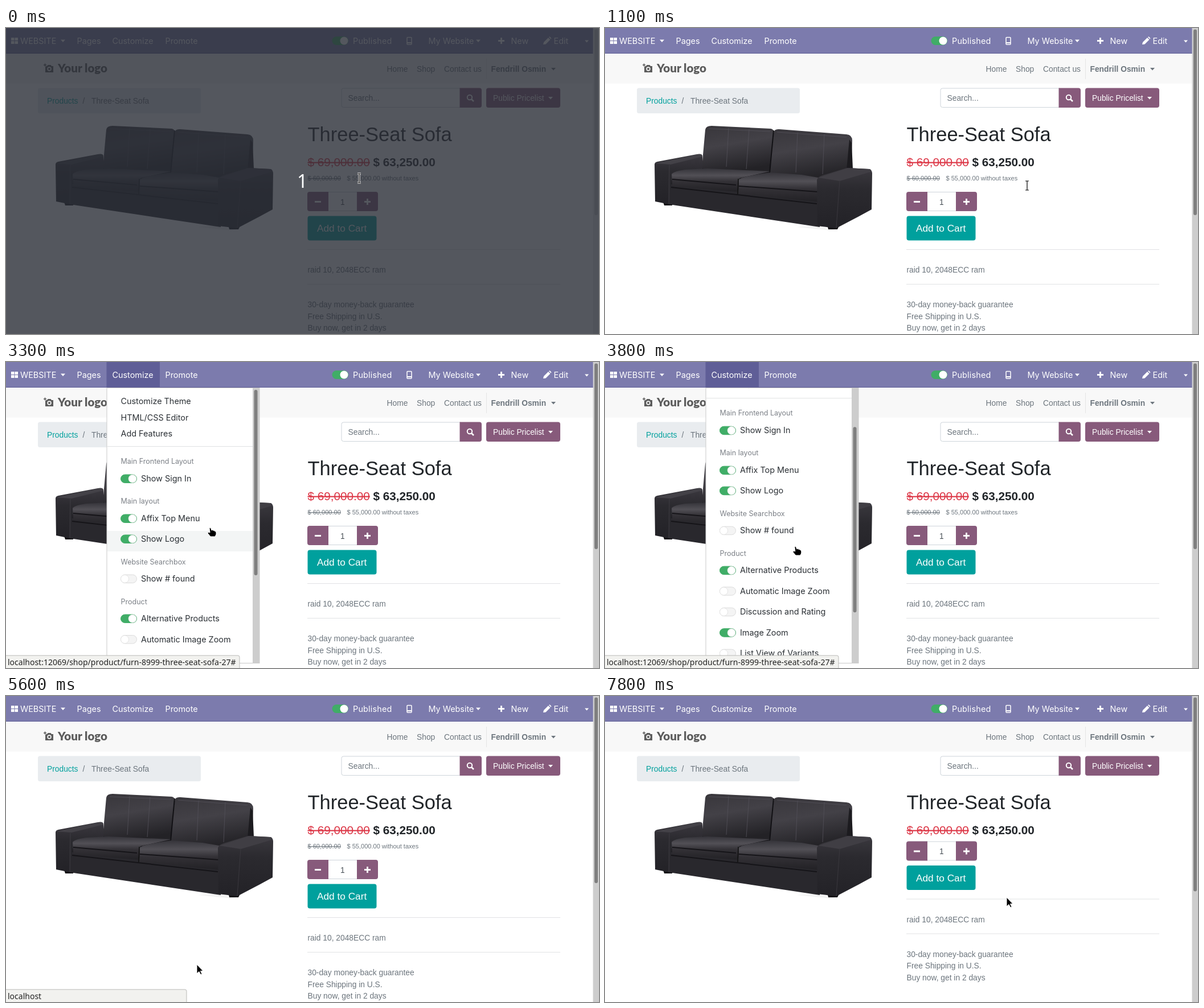
An HTML page for the animation above (8 s loop, 1041 px wide and 538 px high).

```html
<!DOCTYPE html>
<html lang="en">
<head>
<meta charset="utf-8">
<title>Shop page customization</title>
<style>
html, body { margin: 0; width: 100%; height: 100%; overflow: hidden; background: #fff; }
svg { display: block; width: 100vw; height: 100vh; }
text { white-space: pre; }
.page { font: 13.8px "Liberation Sans", Arial, sans-serif; fill: #6c757d; }
.bar { font: 14.4px Inter, sans-serif; fill: #fff; }
.menu { font: 14.4px Inter, sans-serif; fill: #2b3035; }
.head { font-size: 12.5px; fill: #7c8087; }
.status { font: 14px "Noto Sans", sans-serif; fill: #222; }
.strike { text-decoration: line-through; }
.bold { font-weight: 700; }
</style>
</head>
<body>
<svg id="stage" viewBox="0 0 1041 538" preserveAspectRatio="none">
  <defs>
    <linearGradient id="back" x1="0" y1="0" x2=".25" y2="1"><stop stop-color="#38363b"/><stop offset=".45" stop-color="#434147"/><stop offset="1" stop-color="#232226"/></linearGradient>
    <linearGradient id="seat" x1="0" y1="0" x2="0" y2="1"><stop stop-color="#35343a"/><stop offset=".3" stop-color="#525056"/><stop offset=".55" stop-color="#333136"/><stop offset="1" stop-color="#222125"/></linearGradient>
    <linearGradient id="arm" x1="0" y1="0" x2="0" y2="1"><stop stop-color="#3b393f"/><stop offset=".35" stop-color="#2b2a2f"/><stop offset="1" stop-color="#232227"/></linearGradient>
    <clipPath id="menuClip"><rect x="178" y="46" width="255" height="483"/></clipPath>
  </defs>
  <rect width="1041" height="538" fill="#fff"/>

  <g class="page">
    <rect y="45" width="1031" height="52.5" fill="#f8f8f8"/>
    <g fill="#5c5c5c">
      <path d="M69 67h3l1.500-2h5l1.500 2h3v11H69z"/>
      <circle cx="76" cy="72" r="3.700" fill="#f8f8f8"/><circle cx="76" cy="72" r="2.100"/>
      <path d="M65 65h6M68 62v6" stroke="#f8f8f8" stroke-width="4"/><path d="M66 65h5M68.500 62.500v5" stroke="#5c5c5c" stroke-width="1.500"/>
      <text x="91" y="78" style="font:900 20.500px Lato,sans-serif">Your logo</text>
    </g>
    <text x="668.500" y="77">Home</text><text x="721" y="77">Shop</text><text x="769" y="77">Contact us</text>
    <path d="M843.500 54v36" stroke="#e5e5e5"/>
    <text x="851.500" y="77" class="bold">Fendrill Osmin</text>
    <path d="M957 70h8l-4 4.500z"/>

    <rect x="56" y="105.500" width="286" height="44.500" rx="3.500" fill="#e9ecef"/>
    <text x="72" y="133" fill="#00a09d">Products</text><text x="134.500" y="133">/</text><text x="150" y="133">Three-Seat Sofa</text>
    <rect x="589" y="106" width="212" height="33.500" rx="3.500" fill="#fff" stroke="#ced4da"/>
    <text x="600.500" y="128">Search...</text>
    <path d="M796.500 105.500h34.500a4 4 0 0 1 4 4v26.500a4 4 0 0 1-4 4h-34.500z" fill="#875a7b"/>
    <g fill="none" stroke="#fff" stroke-width="2"><circle cx="814" cy="122" r="4.200"/><path d="M817 125l4 4" stroke-width="2.500"/></g>
    <rect x="843" y="105.500" width="130" height="34.500" rx="4" fill="#875a7b"/>
    <text x="855" y="128" fill="#fff">Public Pricelist</text><path d="M952 121h8l-4 4.500z" fill="#fff"/>

    <g id="sofa">
      <path d="M336 350L378 347l14 7 18-2-12 4z" fill="#f3f3f3"/>
      <path d="M102 306h16v6h-14zM390 346h22l-4 8h-16z" fill="#151417"/>
      <path d="M115 250L172 236H432V300L375 345 112 300z" fill="#1b1a1e"/>
      <path d="M170 245L176 179Q177 172 187 172L291 177Q297 178 296 185L289 252 180 256z" fill="url(#back)"/>
      <path d="M289 256L296 184Q297 177 306 178L424 187Q434 188 434 198L432 250 374 270z" fill="url(#back)"/>
      <path d="M429 196l4 6 2 45-11 3z" fill="#1c1b1f"/>
      <path d="M182 177L290 182M302 183L424 192M217 176l-4 68M253 178l-5 70M338 184l-3 70M385 187l-3 70" fill="none" stroke="#54515a" stroke-width=".8"/>
      <path d="M296 180l-7 75" stroke="#111014" stroke-width="2"/>
      <path d="M87 240Q87 236 92 235L161 222Q171 220 171 227V248L118 256 113 310 88 305z" fill="url(#arm)"/>
      <path d="M88 238L165 222Q171 221 171 226L115 240z" fill="#434147"/>
      <path d="M112 274L377 299V350L112 310z" fill="#29282d"/>
      <path d="M117 257Q120 252 141 249L180 247 290 252 236 264 232 288 118 278z" fill="url(#seat)"/>
      <path d="M235 267Q238 261 290 254L345 258 380 264 375 306 234 292z" fill="url(#seat)"/>
      <path d="M118 266L230 276M235 278L374 288M116 280L372 309" fill="none" stroke="#151418" stroke-width="2"/>
      <path d="M234 265L233 292" stroke="#111" stroke-width="1.500"/>
      <path d="M372 267Q374 260 388 257L425 246 463 248Q469 249 469 256L468 319 446 331 406 352 373 348z" fill="url(#arm)"/>
      <path d="M374 263L427 246 465 248Q469 250 466 253L412 269z" fill="#403e44"/>
      <path d="M412 268L406 351" stroke="#3a383e"/>
      <path d="M113 241L112 309" stroke="#3e3c42"/>
    </g>

    <text x="529.500" y="198.500" font-size="34.500" fill="#212529">Three-Seat Sofa</text>
    <text x="529.500" y="243" font-size="20.700" fill="#dc3545" class="strike">$ 69,000.00</text>
    <text x="644.500" y="243" font-size="20.700" fill="#212529" class="bold">$ 63,250.00</text>
    <g id="untaxed" font-size="11.040">
      <text x="529.500" y="268" class="strike">$ 60,000.00</text><text x="598.500" y="268">$ 55,000.00 without taxes</text>
    </g>
    <g id="details">
      <rect x="530" y="288.500" width="122" height="33" rx="3.500" fill="#fff" stroke="#ced4da"/>
      <path d="M566 288v34h-33a4 4 0 0 1-4-4v-26a4 4 0 0 1 4-4zM616 288v34h33a4 4 0 0 0 4-4v-26a4 4 0 0 0-4-4z" fill="#875a7b"/>
      <path d="M542 305.500h11M629 305.500h11M634.500 300v11" stroke="#fff" stroke-width="2.800"/>
      <text x="587" y="310.500" fill="#495057">1</text>
      <rect x="529.500" y="330.500" width="121" height="43" rx="4" fill="#00a09d"/>
      <text x="546" y="358" font-size="17.250" fill="#fff">Add to Cart</text>
      <path d="M529 389.500H973M529 450.500H973" stroke="#e1e2e4"/>
      <text x="529.500" y="430">raid 10, 2048ECC ram</text>
      <text x="529.500" y="491">30-day money-back guarantee</text>
      <text x="529.500" y="511.500">Free Shipping in U.S.</text>
      <text x="529.500" y="532">Buy now, get in 2 days</text>
    </g>
  </g>

  <g class="bar">
    <rect width="1031" height="45" fill="#7c7bad"/>
    <path d="M0 44.500H1031" stroke="#5f5e97"/>
    <rect id="active" x="176.500" width="93.500" height="45" fill="#5f5e97"/>
    <path d="M9 17h5.500v5H9zm6.500 0H21v5h-5.500zM9 23h5.500v5H9zm6.500 0H21v5h-5.500z"/>
    <text x="25" y="28">WEBSITE</text><path d="M96 20.500h8l-4 4.500z"/>
    <text x="124.500" y="28">Pages</text><text x="186.500" y="28">Customize</text><text x="279.500" y="28">Promote</text>
    <rect x="572.500" y="15" width="28.500" height="15" rx="7.500" fill="#40ad67"/><circle cx="593.500" cy="22.500" r="7"/>
    <text x="609" y="28" letter-spacing=".2">Published</text>
    <rect x="704" y="16.500" width="8" height="12.500" rx="1" fill="none" stroke="#fff" stroke-width="1.500"/><path d="M704 26h8" stroke="#fff" stroke-width="2"/>
    <text x="741.500" y="28">My Website</text><path d="M825 20.500h8l-4 4.500z"/>
    <path d="M864 22.500h11M869.500 17v11" stroke="#fff" stroke-width="2.800"/>
    <text x="886.500" y="28">New</text>
    <path d="M943 29l1-4 8-8 3.500 3.500-8 8zM953 16l1.500-1 3 3-1 1.500z"/>
    <text x="961.500" y="28">Edit</text><path d="M1016 21.500h7l-3.500 4z"/>
  </g>
  <rect id="track" x="1030.500" width="10.500" height="538"/>
  <rect id="thumb" x="1033" y="2.500" width="6" rx="3"/>

  <g id="menu" class="menu">
    <rect x="177" y="45.500" width="268" height="484" fill="#fff" stroke="#c9c9c9"/>
    <g clip-path="url(#menuClip)"><g id="items"></g></g>
    <rect x="433" y="46" width="12" height="484" fill="#cdcdcd"/>
    <rect id="menuThumb" x="435.500" y="49" width="6" height="326" rx="3" fill="#7f7f7f"/>
  </g>

  <g id="status" class="status">
    <rect id="statusBox" x="-3" y="516" height="26" rx="3" fill="#f2f2ef" stroke="#b9b9b6"/>
    <text id="statusText" x="3" y="533"></text>
  </g>

  <g id="countdown">
    <rect width="1041" height="538" fill="#2a2d36" opacity=".8"/>
    <text x="511" y="281" fill="#fff" style="font:32px 'Noto Sans',sans-serif">1</text>
  </g>

  <g id="cursor" stroke-linejoin="round">
    <g id="beam" fill="none"><path d="M-3-8H3M0-8V8M-3 8H3" stroke="#fff" stroke-width="3"/><path d="M-3-8H3M0-8V8M-3 8H3" stroke="#000" stroke-width="1.200"/></g>
    <path id="arrow" d="M0 0V16L4 12.500 6.800 18 9 17 6.500 11.500H11z" stroke="#fff" stroke-width="1"/>
    <path id="hand" d="M-4-7Q-2-9-1-6L0-3Q2-5 3-2.500 5-4 5.500-1.500 8-2 8 1V4L6 8H-2L-7 2Q-7-.500-4 .500L-3 1z" stroke="#fff" stroke-width="1"/>
  </g>
</svg>
<script>
const LOOP = 8000, STEP = 100;
const byId = id => document.getElementById(id);
const set = (id, attrs) => Object.entries(attrs).forEach(([k, v]) => byId(id).setAttribute(k, v));
const show = (id, on) => set(id, { display: on ? "inline" : "none" });

// Menu entries: kind, centre line, label, switch state
const entries = [
  ["link", 69, "Customize Theme"], ["link", 97.5, "HTML/CSS Editor"], ["link", 126, "Add Features"],
  ["head", 174, "Main Frontend Layout"], ["switch", 205, "Show Sign In", 1],
  ["head", 244, "Main layout"], ["switch", 275, "Affix Top Menu", 1], ["switch", 311, "Show Logo", 1],
  ["head", 350.5, "Website Searchbox"], ["switch", 381, "Show # found", 0],
  ["head", 420.5, "Product"], ["switch", 451, "Alternative Products", 1],
  ["switch", 487.5, "Automatic Image Zoom", 0], ["switch", 524, "Discussion and Rating", 0],
  ["switch", 560.5, "Image Zoom", 1], ["switch", 597, "List View of Variants", 0],
  ["switch", 633.5, "Select Quantity", 1],
  ["head", 672.5, "product_price"], ["switch", 703, "Alternative (un)taxed price", 1]
];

const toggle = (y, on) =>
  `<rect x="201.5" y="${y - 7}" width="28" height="14.500" rx="7.250" fill="${on ? "#40ad67" : "#f4f4f4"}" stroke="${on ? "#40ad67" : "#dcdcdc"}"/>
   <circle cx="${on ? 222 : 208.5}" cy="${y + .25}" r="7" fill="#fff" stroke="#dcdcdc" stroke-width=".7"/>`;

function drawItems(hoverY, taxedOn) {
  byId("items").innerHTML = '<path d="M178 148.500H433" stroke="#dfe1e3"/>' + entries.map(([kind, y, label, on], i) => {
    if (kind !== "switch") return `<text x="201.500" y="${y + 5}" class="${kind}">${label}</text>`;
    const hovered = hoverY >= y - 14 && hoverY < y + 22;
    const state = i === entries.length - 1 ? taxedOn : on;
    return (hovered ? `<rect x="178" y="${y - 14}" width="255" height="36" fill="#f3f5f5"/>` : "") +
      toggle(y, state) + `<text x="237" y="${y + 5}">${label}</text>`;
  }).join("");
}

const pointer = [
  [0, 620, 264, "beam"], [100, 612, 264], [300, 612, 264], [700, 617, 264], [1000, 617, 264],
  [1100, 741, 277], [1300, 741, 277], [1500, 534, 270], [1600, 704, 276], [1700, 704, 276],
  [1800, 592, 152, "arrow"], [2000, 228, 30, "hand"], [2100, 161, 22], [2200, 161, 22],
  [2400, 228, 28], [2800, 228, 28], [3300, 361, 299], [3700, 338, 330], [4200, 332, 340],
  [4300, 332, 340], [4400, 329, 362], [4800, 333, 503], [5400, 333, 503],
  [5500, 335, 485, "arrow"], [5600, 335, 472], [7300, 335, 472], [7800, 705, 354]
];
const scrolling = [[0, 0], [3500, 0], [3700, 57], [4200, 196]];

function sample(keys, t) {
  const n = keys.findIndex(k => k[0] > t);
  if (n < 0) return keys[keys.length - 1].slice(1, 3);
  const a = keys[n - 1], b = keys[n], p = (t - a[0]) / (b[0] - a[0]);
  return [1, 2].map(i => a[i] + (b[i] - a[i]) * p);
}

function drawStatus(t) {
  const loading = t >= 5300, width = loading ? 317 : 410;
  const right = t >= 4700 && t < 5500;
  show("status", t >= 2000 && t < 7100);
  set("status", { transform: `translate(${right ? 1041 - width : 0})` });
  set("statusBox", { width: width + 3 });
  byId("statusText").textContent = loading ? "localhost" : "localhost:12069/shop/product/furn-8999-three-seat-sofa-27#";
}

function draw(t) {
  const [x, y] = sample(pointer, t), [scroll] = sample(scrolling, t);
  const shape = pointer.filter(k => k[3] && k[0] <= t).pop()[3];
  const reloaded = t >= 7100, menuOpen = t >= 2600 && t < 5300, scrollbarIdle = t < 400;

  show("countdown", t < 100);
  show("active", t >= 2000 && t < 5300);
  show("menu", menuOpen);
  if (menuOpen) {
    drawItems(y + scroll, t < 5100);
    set("items", { transform: `translate(0 ${-scroll})` });
    set("menuThumb", { y: 49 + scroll * 151 / 196 });
  }
  drawStatus(t);
  show("untaxed", !reloaded);
  set("details", { transform: `translate(0 ${reloaded ? -32.5 : 0})` });
  set("track", { fill: scrollbarIdle ? "#eeeeee" : "#cdcdcd" });
  set("thumb", { height: reloaded ? 341 : 326.5, fill: scrollbarIdle ? "#c8c8c8" : "#7f7f7f" });
  ["beam", "arrow", "hand"].forEach(id => show(id, id === shape));
  set("cursor", { transform: `translate(${x} ${y})` });
}

const start = performance.now();
let last = -1;
function frame() {
  const t = Math.floor((performance.now() - start) % LOOP / STEP) * STEP;
  if (t !== last) draw(last = t);
  requestAnimationFrame(frame);
}
frame();
</script>
</body>
</html>
```
